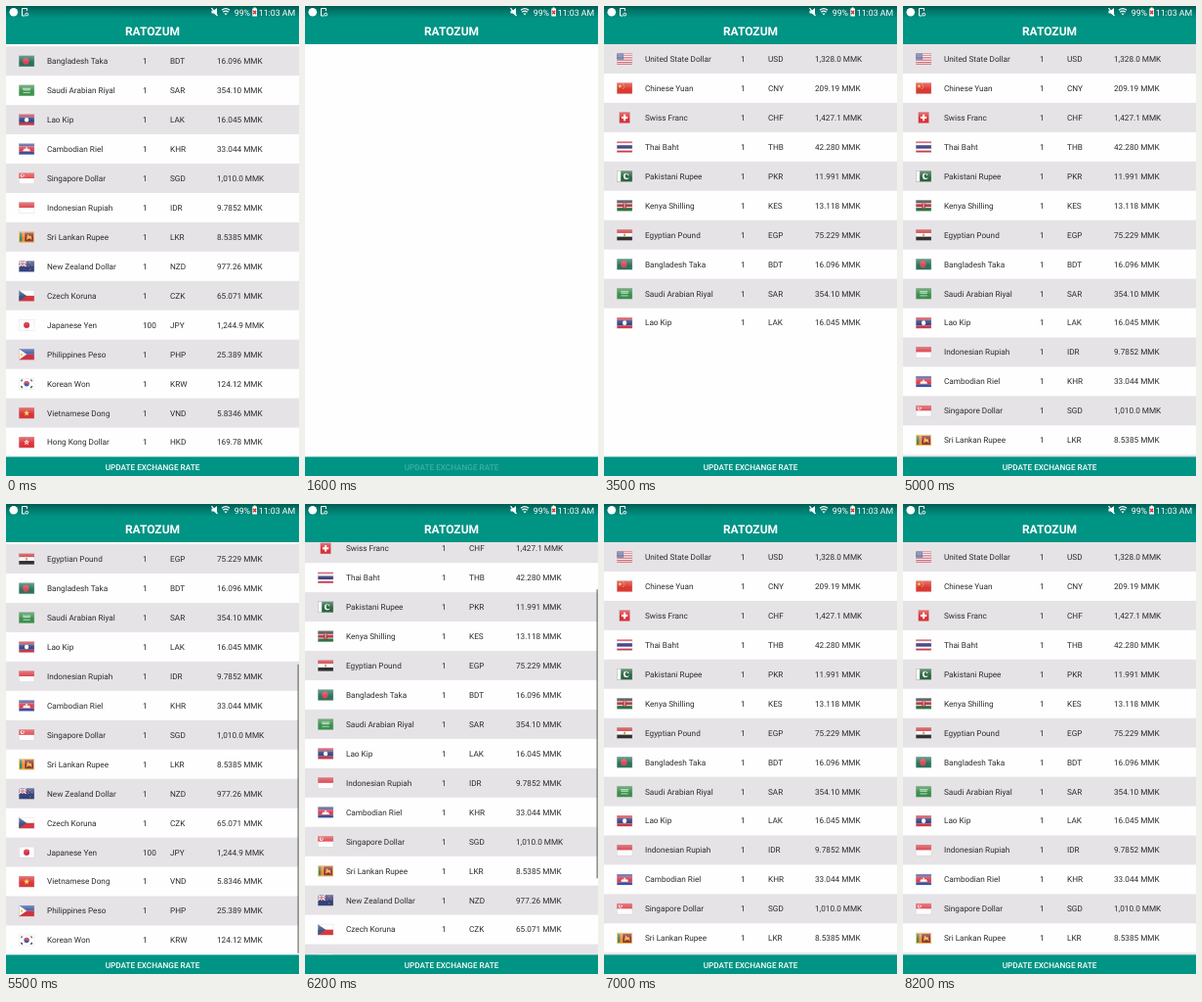
Animation of 300x480 px, one loop 8300 ms. Source, as an HTML page:

```html
<!DOCTYPE html>
<html lang="en">
<head>
<meta charset="utf-8">
<title>Exchange rates</title>
<style>
  html, body { margin: 0; width: 100%; height: 100%; overflow: hidden; background: #fefefe; }
  svg { display: block; width: 100%; height: 100%; }
  text { font-family: Roboto, sans-serif; font-size: 8.2px; fill: #2c2c2c; white-space: pre; text-rendering: geometricPrecision; }
  .light { fill: #fff; }
</style>
</head>
<body>
<svg viewBox="0 0 300 480">
  <defs>
    <clipPath id="view"><rect y="38" width="300" height="423"/></clipPath>
    <linearGradient id="status" x2="0" y2="1">
      <stop stop-color="#00584f"/>
      <stop offset=".35" stop-color="#007468"/>
      <stop offset="1" stop-color="#009485"/>
    </linearGradient>
    <linearGradient id="gloss" x2="0" y2="1">
      <stop stop-color="#fff" stop-opacity=".32"/>
      <stop offset="1" stop-color="#fff" stop-opacity="0"/>
    </linearGradient>
  </defs>
  <rect width="300" height="480" fill="#fefefe"/>
  <g clip-path="url(#view)">
    <g id="before"></g>
    <g id="after"></g>
    <rect id="bar" x="298.4" width="1.6" height="295" fill="#777"/>
    <path id="spin" fill="none" stroke="#009485" stroke-width="1.7"/>
  </g>
  <rect width="300" height="39" fill="#009485"/>
  <rect width="300" height="13" fill="url(#status)"/>
  <text class="light" x="150" y="30" text-anchor="middle" style="font-size:12px;font-weight:700">RATOZUM</text>

  <circle cx="7.8" cy="6.2" r="4.3" fill="#fff"/>
  <g fill="none" stroke="#fff">
    <path d="M21.5 5V2.5H16.5V10H19.5"/>
    <circle cx="21.3" cy="8.6" r="1.4"/>
    <path d="M210.5 2.2L216.5 9.8" stroke-width="1.2"/>
    <path d="M221 4.2Q225 .9 229 4.2M222.3 6.2Q225 4 227.7 6.2" stroke-width="1.2"/>
  </g>
  <path fill="#fff" d="M210.5 4.8H212.6L216 2V10L212.6 7.6H210.5ZM223.4 7.4H226.6L225 9.6ZM252.3 2.5H253.6V1.5H255.6V2.5H257V10.5H252.3Z"/>
  <path d="M253.2 4.8L256.1 8.2M256.1 4.8L253.2 8.2" stroke="#d8332c" stroke-width="1.4"/>
  <text class="light" x="233.7" y="9.5" style="font-size:8.8px">99%</text>
  <text class="light" x="258.7" y="9.5" style="font-size:8.8px">11:03 AM</text>

  <rect y="460.4" width="300" height="19.6" fill="#009485"/>
  <text id="label" class="light" x="150" y="473.5" text-anchor="middle" style="font-weight:500">UPDATE EXCHANGE RATE</text>
</svg>
<script>
const LOOP = 8300, STEP = 100, PITCH = 29.95, TOP = 54, END = 177.6;
const $ = id => document.getElementById(id);

// Flags live in a 15 x 10 box.
const rect = (x, y, w, h, c) => `<rect x="${x}" y="${y}" width="${w}" height="${h}" fill="${c}"/>`;
const dot = (x, y, r, c) => `<circle cx="${x}" cy="${y}" r="${r}" fill="${c}"/>`;
const shape = (d, c) => `<path d="${d}" fill="${c}"/>`;
const line = (d, c, w) => `<path d="${d}" stroke="${c}" stroke-width="${w}" fill="none"/>`;
const fill = c => rect(0, 0, 15, 10, c);
const bands = (...list) => {
  const total = list.reduce((sum, b) => sum + b[1], 0);
  let y = 0;
  return list.map(([c, n]) => {
    const h = n / total * 10, s = rect(0, y, 15, h, c);
    y += h;
    return s;
  }).join('');
};
const star = (x, y, r, c) => {
  const pts = Array.from({ length: 10 }, (_, i) => {
    const a = i * Math.PI / 5, q = i % 2 ? r * .4 : r;
    return (x + q * Math.sin(a)).toFixed(2) + ' ' + (y - q * Math.cos(a)).toFixed(2);
  });
  return shape('M' + pts.join('L') + 'Z', c);
};
const crescent = (x, y, r, c, back) => dot(x, y, r, c) + dot(x + r * .35, y - r * .1, r * .8, back);

const flags = {
  USD: bands(...Array.from({ length: 13 }, (_, i) => [i % 2 ? '#fff' : '#c8384a', 1])) +
    rect(0, 0, 6.5, 5.4, '#3f4f8c') + line('M.8 1.3H6M.8 2.8H6M.8 4.2H6', '#b9c2e0', .5),
  CNY: fill('#d9281f') + star(3, 3, 2, '#ffd83a') + [[6, 1], [7, 2.4], [7, 4], [6, 5.4]].map(p => star(...p, .7, '#ffd83a')).join(''),
  CHF: rect(2.4, 0, 10.2, 10, '#d8232a') + rect(6.5, 2, 2, 6, '#fff') + rect(4.5, 4, 6, 2, '#fff'),
  THB: bands(['#c8283c', 1], ['#fff', 1], ['#2f3275', 2], ['#fff', 1], ['#c8283c', 1]),
  PKR: fill('#1c5c34') + rect(0, 0, 3.7, 10, '#fff') + crescent(9.2, 5, 2.8, '#fff', '#1c5c34') + star(10.8, 3.6, 1, '#fff'),
  KES: bands(['#222', 5], ['#fff', 1], ['#b3202c', 5], ['#fff', 1], ['#176a35', 5]) +
    '<ellipse cx="7.5" cy="5" rx="1.8" ry="3.6" fill="#a01c28"/>' + line('M7.5 2.6V7.4', '#fff', .7),
  EGP: bands(['#ca2530', 1], ['#fff', 1], ['#222', 1]) + rect(6.6, 3.8, 1.8, 2.4, '#c79a35'),
  BDT: fill('#17694e') + dot(6.8, 5, 3.1, '#e0364a'),
  SAR: fill('#2c8a3f') + line('M3.5 3.2H11.5M4 4.6H11', '#e4f2e4', .8) + line('M4 7H11', '#fff', .6),
  LAK: bands(['#c7283a', 1], ['#233a7c', 2], ['#c7283a', 1]) + dot(7.5, 5, 2.1, '#fff'),
  IDR: bands(['#d8303c', 1], ['#fff', 1]),
  KHR: bands(['#2f3f94', 1], ['#d8303c', 2], ['#2f3f94', 1]) +
    shape('M4 7V5.6H5V4.5H6V5.2H6.8V3.3H8.2V5.2H9V4.5H10V5.6H11V7Z', '#fff'),
  SGD: bands(['#e0363f', 1], ['#fff', 1]) + crescent(3.3, 2.5, 1.7, '#fff', '#e0363f') + dot(4.6, 2.4, .7, '#fff'),
  LKR: fill('#eeb82f') + rect(.8, .9, 2, 8.2, '#28785c') + rect(2.8, .9, 2, 8.2, '#dd7a2c') +
    rect(5.6, .9, 8.6, 8.2, '#8c2434') + shape('M7.4 7.8L8 4 9 2.4 10.2 4.2 12 4 12.8 7.8 11 6.4 9 6.6Z', '#eeb82f'),
  NZD: fill('#233573') + line('M0 0L7 5M7 0L0 5', '#fff', 1.2) + line('M3.5 0V5M0 2.5H7', '#fff', 1.8) +
    line('M3.5 0V5M0 2.5H7', '#cc2a36', .9) + [[11, 2], [9.3, 4.5], [12.8, 4], [11, 7.8]].map(p => star(...p, 1, '#e05563')).join(''),
  CZK: bands(['#fff', 1], ['#d4282f', 1]) + shape('M0 0L7.5 5L0 10Z', '#28497e'),
  JPY: fill('#fff') + dot(7.5, 5, 2.9, '#cf2238'),
  VND: fill('#d8272c') + star(7.5, 5.1, 3, '#ffe23c'),
  PHP: bands(['#2a4aa0', 1], ['#cc2535', 1]) + shape('M0 0L7.6 5L0 10Z', '#fff') + dot(2.6, 5, 1.2, '#f3c53a'),
  KRW: fill('#fff') + dot(7.5, 5, 2.5, '#2c4f9e') + shape('M5 5A2.5 2.5 0 0 1 10 5Q8.7 6 7.5 5T5 5Z', '#cf2c40') +
    line('M2 2.8L3.4 1.2M11.6 1.2L13 2.8M2 7.2L3.4 8.8M11.6 8.8L13 7.2', '#333', 1.3),
  HKD: fill('#d9262c') + star(7.5, 5, 3, '#fff') + dot(7.5, 5, .7, '#d9262c')
};

const rates = {
  USD: ['United State Dollar', '1,328.0'], CNY: ['Chinese Yuan', '209.19'],
  CHF: ['Swiss Franc', '1,427.1'], THB: ['Thai Baht', '42.280'],
  PKR: ['Pakistani Rupee', '11.991'], KES: ['Kenya Shilling', '13.118'],
  EGP: ['Egyptian Pound', '75.229'], BDT: ['Bangladesh Taka', '16.096'],
  SAR: ['Saudi Arabian Riyal', '354.10'], LAK: ['Lao Kip', '16.045'],
  IDR: ['Indonesian Rupiah', '9.7852'], KHR: ['Cambodian Riel', '33.044'],
  SGD: ['Singapore Dollar', '1,010.0'], LKR: ['Sri Lankan Rupee', '8.5385'],
  NZD: ['New Zealand Dollar', '977.26'], CZK: ['Czech Koruna', '65.071'],
  JPY: ['Japanese Yen', '1,244.9'], VND: ['Vietnamese Dong', '5.8346'],
  PHP: ['Philippines Peso', '25.389'], KRW: ['Korean Won', '124.12'],
  HKD: ['Hong Kong Dollar', '169.78']
};

function row(code, i) {
  const [name, value] = rates[code];
  const cell = (x, s) => `<text x="${x}" y="2.9">${s}</text>`;
  const [x, w] = code === 'CHF' ? [2.4, 10.2] : [0, 15];
  return `<g transform="translate(0 ${(i * PITCH).toFixed(2)})">` +
    (i % 2 ? '' : rect(0, -15, 300, PITCH, '#e6e3e6')) +
    `<g transform="translate(13.3 -5.4) scale(1.04 1.1)" opacity=".92">${flags[code]}` +
    rect(x, 0, w, 6, 'url(#gloss)') +
    `<rect x="${x}" width="${w}" height="10" fill="none" stroke="#999" stroke-opacity=".3" stroke-width=".5"/></g>` +
    cell(42, name) + cell(140, code === 'JPY' ? 100 : 1) + cell(168, code) + cell(216, value + ' MMK') + '</g>';
}

const list = codes => codes.split(' ').map(row).join('');
$('before').innerHTML = list('BDT SAR LAK KHR SGD IDR LKR NZD CZK JPY PHP KRW VND HKD');
$('before').setAttribute('transform', 'translate(0 56.2)');
$('after').innerHTML = list('USD CNY CHF THB PKR KES EGP BDT SAR LAK IDR KHR SGD LKR NZD CZK JPY VND PHP KRW');
const late = [...$('after').children].slice(10);

// Eased value between [time, value] keys.
function track(t, keys) {
  const i = keys.findIndex(k => k[0] > t);
  if (i === 0) return keys[0][1];
  if (i < 0) return keys[keys.length - 1][1];
  const [t0, a] = keys[i - 1], [t1, b] = keys[i], p = (t - t0) / (t1 - t0);
  return a + (b - a) * p * p * (3 - 2 * p);
}
const show = (el, on) => el.setAttribute('visibility', on ? 'inherit' : 'hidden');

function arc(t) {
  const turn = t / 1333 * 2 * Math.PI;
  const sweep = 2.6 + 2 * Math.sin(turn);
  const at = a => `${150.3 + 7 * Math.sin(a)} ${249.5 - 7 * Math.cos(a)}`;
  return `M${at(turn)}A7 7 0 ${sweep > Math.PI ? 1 : 0} 1 ${at(turn + sweep)}`;
}

function draw(t) {
  show($('before'), t < 1600);
  show($('after'), t >= 3400);
  late.forEach(el => show(el, t >= 4600));

  const scroll = track(t, [[5330, 0], [5500, END], [6000, END], [6350, -2], [6450, -2], [6600, 0]]);
  $('after').setAttribute('transform', `translate(0 ${TOP - scroll})`);
  $('bar').setAttribute('y', 39 + Math.max(0, scroll) * 421 / 599);
  $('bar').setAttribute('opacity', track(t, [[4599, 0], [4600, .8], [4750, .8], [5000, 0], [5399, 0], [5400, .8], [6700, .8], [7000, 0]]));

  show($('spin'), t >= 1700 && t < 3400);
  $('spin').setAttribute('d', arc(t - 1700));
  $('label').setAttribute('opacity', track(t, [[1350, 1], [1500, .24], [1600, .24], [1850, 1]]));
}

const start = performance.now();
function tick() {
  const t = (performance.now() - start) % LOOP;
  draw(Math.floor(t / STEP) * STEP);
  requestAnimationFrame(tick);
}
tick();
</script>
</body>
</html>
```
